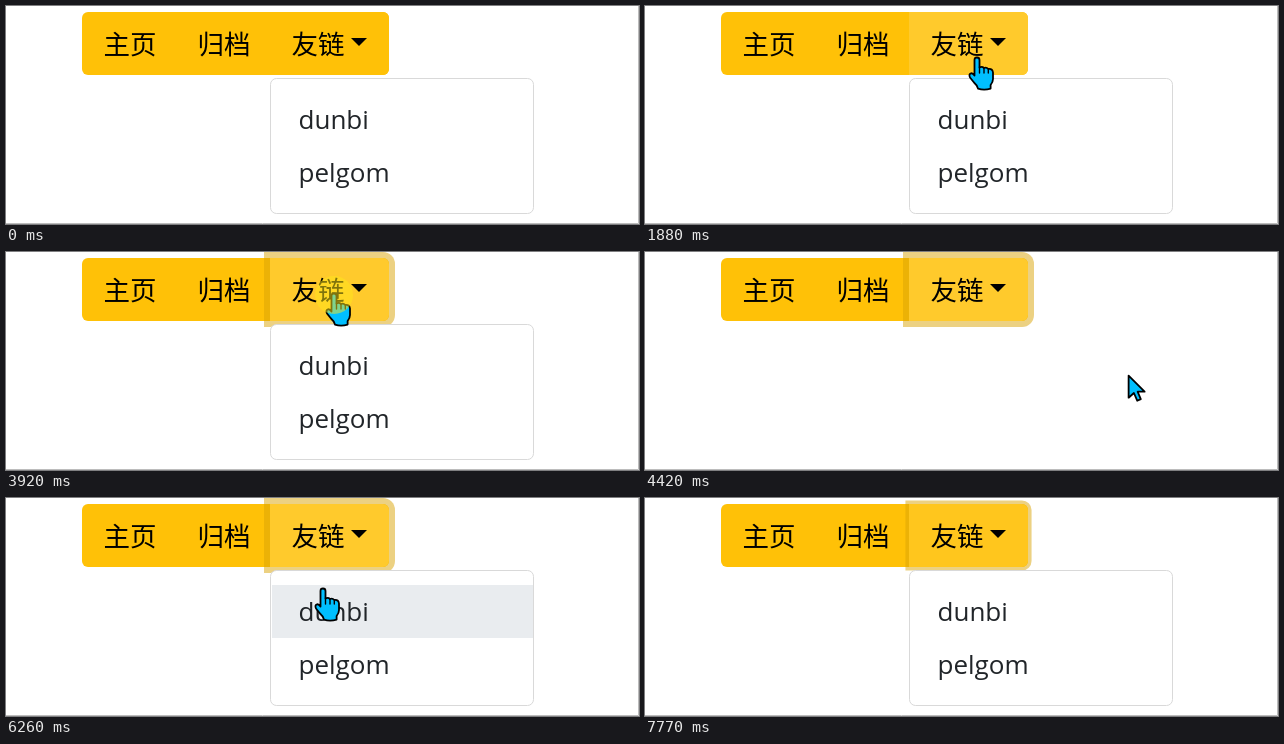
An HTML page for the animation above (7.79 s loop, 633 by 218 pixels).

```html
<!DOCTYPE html>
<html lang="zh">
<head>
<meta charset="utf-8">
<title>Dropdown menu</title>
<style>
html, body { margin: 0; width: 100%; height: 100%; overflow: hidden; background: #fff; }
svg { display: block; width: 633px; height: 218px; }
.nav { font: 26.5px "Noto Sans CJK SC", "Noto Sans CJK", sans-serif; fill: #000; }
.item { font: 26px "Open Sans", "Noto Sans", sans-serif; fill: #212529; }
.cursor { fill: #00bfff; stroke: #000; stroke-width: 1.8; stroke-linejoin: round; stroke-linecap: round; }
</style>
</head>
<body>
<svg viewBox="0 0 633 218">
  <path d="M632.5 0V217.5H0" fill="none" stroke="#bcbcbc"/>
  <circle id="arc" cx="388" fill="#45cbd9"/>
  <rect x="76" y="6" width="307" height="63" rx="6" fill="#ffc107"/>
  <path id="ring" fill="#d9a406" fill-opacity=".5"/>
  <path id="btn"/>
  <g class="nav">
    <text x="97.5" y="48">主页</text>
    <text x="191.5" y="48">归档</text>
    <text x="285.5" y="48">友链</text>
  </g>
  <path d="M345 32H361L353 40Z"/>
  <g id="menu">
    <rect x="264.5" y="72.5" width="263" height="135" rx="6" fill="#fff" stroke="#d9d9d9"/>
    <rect id="hover" x="266" width="261" height="53" fill="#e9ecef"/>
    <g class="item">
      <text x="292.5" y="123">dunbi</text>
      <text x="292.5" y="176">pelgom</text>
    </g>
  </g>
  <g id="hand" class="cursor">
    <path d="M-2.5 3A2.5 2.5 0 0 1 2.5 3V10.5Q5 9 7 11Q9.5 10 11.3 12Q15.5 11.5 16 15.5V22Q16 25 13.6 28V31.6Q7 33.5 1 31.6Q0 28 -3 25.5L-7 20.5Q-8.5 17 -6 16.3Q-4 16 -2.5 18.6Z"/>
    <path d="M2.5 10V16M7 11.5V16M11.3 12.5V16" fill="none" stroke-width="1.4"/>
  </g>
  <path id="arrow" class="cursor" d="M0 0V22L5.3 17.3L8.6 25L12.2 23.4L9 16H16Z"/>
  <circle id="halo" r="19" fill="#ffe81a"/>
</svg>
<script>
const LOOP = 7790;
const START = { x: 546, y: 222 };
const $ = id => document.getElementById(id);
const [arc, ring, btn, menu, hover, hand, arrow, halo] =
  ['arc', 'ring', 'btn', 'menu', 'hover', 'hand', 'arrow', 'halo'].map($);

// pointer trips: the tip rests between them
const trips = [
  { from: 340, to: 1010, x: 405, y: 105 },
  { from: 1150, to: 1880, x: 332, y: 51 },
  { from: 2250, to: 2660, x: 328, y: 41 },
  { from: 4150, to: 4680, x: 629, y: 201 },
  { from: 4780, to: 4940, x: 629, y: 238 },
  { from: 5250, to: 5560, x: 320, y: 32 },
  { from: 5960, to: 6260, x: 317, y: 90 },
  { from: 6530, to: 7110, x: 345, y: 222 }
];
const FOCUS = 1885, BLUR = 7710;
const clicks = [2820, 3060, 3920, 5740];

const ramp = (t, start, length) => Math.min(1, Math.max(0, (t - start) / length));
const ease = u => u * u * (3 - 2 * u);
const show = (el, on) => el.setAttribute('visibility', on ? 'visible' : 'hidden');
const place = (el, x, y) => el.setAttribute('transform', `translate(${x} ${y})`);

function tipAt(t) {
  let { x, y } = START;
  for (const trip of trips) {
    const k = ease(ramp(t, trip.from, trip.to - trip.from));
    x += (trip.x - x) * k;
    y += (trip.y - y) * k;
  }
  return { x, y };
}

// button outline grown by s, rounded on the right only
function outline(s) {
  const r = 6 + s, l = 264 - s, x = 383 + s, top = 6 - s, bottom = 69 + s;
  return `M${l} ${top}H${x - r}A${r} ${r} 0 0 1 ${x} ${top + r}V${bottom - r}` +
    `A${r} ${r} 0 0 1 ${x - r} ${bottom}H${l}Z`;
}

function drawButton(t) {
  const fade = 1 - ramp(t, BLUR, 150);
  const focus = ramp(t, FOCUS, 100) * fade;
  const lit = ramp(t, 1700, 150) * fade;
  ring.setAttribute('d', outline(6 * focus));
  show(ring, focus > 0);
  btn.setAttribute('d', outline(0));
  btn.setAttribute('fill', `rgb(255,${193 + 9 * lit},${7 + 37 * lit})`);
}

function drawMenu(open, row) {
  show(menu, open);
  show(hover, row >= 0);
  hover.setAttribute('y', 87 + 53 * row);
}

function drawHalo(t, x, y) {
  const last = Math.max(...[FOCUS, ...clicks].filter(p => p <= t));
  halo.setAttribute('opacity', 0.5 * (1 - ramp(t, last + 100, 160)));
  show(halo, last > 0);
  place(halo, x, y + 2);
}

function drawArc(t) {
  const r = t < 360 ? 13 : 21;
  arc.setAttribute('r', r);
  arc.setAttribute('cy', (t < 360 ? 216 : 215) + r);
  show(arc, t >= 30 && t < 1200);
}

function draw(t) {
  const { x, y } = tipAt(t);
  const open = clicks.filter(c => c + 80 <= t).length % 2 === 0;
  const onButton = x >= 264 && x < 383 && y >= 6 && y < 69;
  const onItem = open && x >= 266 && x < 527 && y >= 87 && y < 193;
  const link = onButton || onItem;

  drawMenu(open, onItem ? Math.floor((y - 87) / 53) : -1);
  drawButton(t);
  drawHalo(t, x, y);
  drawArc(t);
  show(hand, link);
  show(arrow, !link && y < 220);
  place(hand, x, y);
  place(arrow, x, y);
}

function tick() {
  draw(performance.now() % LOOP);
  requestAnimationFrame(tick);
}
tick();
</script>
</body>
</html>
```
